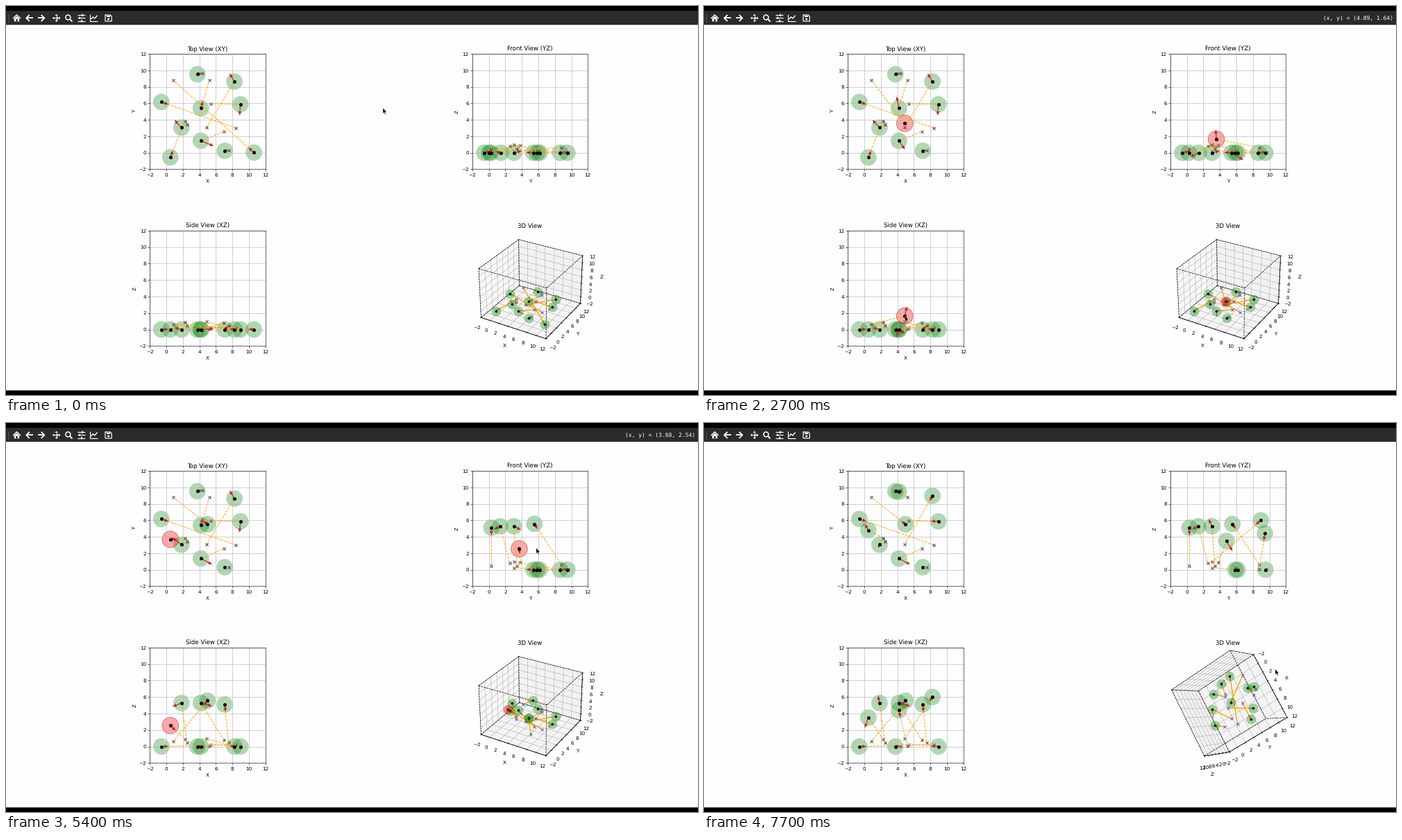
A matplotlib script for the animation above (7.8 s loop, 997x561 px).

```python
import numpy as np
import matplotlib.pyplot as plt
from matplotlib.animation import FuncAnimation
from matplotlib.patches import Circle, Polygon, Rectangle

W, H, DPI = 997, 561, 52
SIDE = 166.4                        # axes size in pixels
UNIT = SIDE / 14                    # pixels per data unit
FRAMES, STEP = 78, 100              # 7800 ms loop
LEAD = 60                           # the pointer runs ahead of the redraw
PX = 72 / DPI                       # one pixel in points
TICKS = range(-2, 13, 2)
PAPER, ARROW = '#fefdff', '#c62424'
GREEN, RED = (0, .5, 0, .3), (1, 0, 0, .33)
GREEN_RIM, RED_RIM = (0, 0, 0, 0), (.7, 0, 0, .6)

plt.rcParams.update({'text.hinting': 'none', 'axes.facecolor': PAPER})

# left, bottom (pixels), title, horizontal and vertical coordinate
VIEWS = [(207.4, 235.4, 'Top View (XY)', 0, 1),
         (671.9, 235.4, 'Front View (YZ)', 1, 2),
         (207.4, 490.3, 'Side View (XZ)', 0, 2)]
TOP, FRONT, SIDEWAYS = range(3)

# the drones start on the ground
START = np.array([
    (3.75, 9.52), (8.24, 8.64), (-.62, 6.16), (4.17, 5.4), (8.96, 5.87),
    (1.82, 3.05), (.47, -.56), (4.17, 1.45), (7.07, .24), (10.6, .02)])
START = np.c_[START, np.zeros(len(START))]
GOAL = np.array([
    (4.4, 9.65, .05), (4.84, 3.06, .95), (8.37, 3.02, .25), (5.18, 8.78, .05),
    (5.34, 5.95, .25), (2.5, 3.38, .5), (2.23, 3.85, .9), (6.94, 2.54, .8),
    (7.53, .32, .5), (.85, 8.77, .65)])

# one drone is dragged through each flat view: view, grab, release, way points
TOUR = [(TOP, 600, 1600, [(5, 2), (-.04, 3.4), (3, 1.4), (4.4, 3.57)]),
        (SIDEWAYS, 1900, 3100, [(2.6, 2.6), (4.89, 1.64), (4.97, 2.2)]),
        (FRONT, 3650, 4350, [(7, 2.4), (5.13, 1.86), (2.5, 3), (5.52, 5.56)])]
# then others are lifted at a steady beat in the front view: drone, y, z
LIFTS = [(8, .31, 5.1), (7, 1.36, 5.28), (5, 3.04, 5.28),
         (6, 4.8, 3.5), (1, 8.97, 6), (3, 9.46, 4.4)]
BEAT, REACH = 272, .33

# camera: time, elevation, azimuth, roll
CAMERA = np.array([(6150, 30, -60, 0), (6500, -37, -92, 117), (7700, 64.3, 60.2, 90)])


def sample(keys, t):
    return np.array([np.interp(t, keys[:, 0], c) for c in keys.T[1:]])


def to_pixel(view, p):
    left, bottom = VIEWS[view][:2]
    return left + (p[0] + 2) * UNIT, bottom - (p[1] + 2) * UNIT


def to_data(view, p):
    left, bottom = VIEWS[view][:2]
    return (p[0] - left) / UNIT - 2, (bottom - p[1]) / UNIT - 2


class Drag:
    def __init__(self, pos, drone, view, t0, t1, points):
        self.drone, self.view, self.t0, self.t1 = drone, view, t0, t1
        self.axes = list(VIEWS[view][3:])
        self.path = np.vstack([pos[drone, self.axes], points])
        pos[drone, self.axes] = self.path[-1]

    def at(self, t):
        """Evenly timed legs; the vertical part of each starts slower."""
        legs = len(self.path) - 1
        u = min((t - self.t0) / (self.t1 - self.t0), 1) * legs
        k = min(int(u), legs - 1)
        a, b = self.path[k:k + 2]
        return a + (b - a) * (u - k) ** np.array([1, 1.37])

    def pixel(self, t):
        return np.array(to_pixel(self.view, self.at(t)))


def plan():
    pos = START.copy()
    drags = [Drag(pos, 9, *leg) for leg in TOUR]
    for drone, y, z in LIFTS:
        t = drags[-1].t1
        drags.append(Drag(pos, drone, FRONT, t + REACH * BEAT, t + BEAT, [(y, z)]))
    return drags


DRAGS = plan()
# pointer rests, grabs and releases, then orbits the 3D view
STOPS = np.array([(0, 543, 147), (200, 543, 147)]
                 + [(t, *d.pixel(t)) for d in DRAGS for t in (d.t0, d.t1)]
                 + [(6150, 735, 420), (6560, 728, 357), (7760, 823, 355)])


def pointer(t):
    for d in DRAGS:
        if d.t0 <= t <= d.t1:
            return d.pixel(t)
    return sample(STOPS, t)


def state(t):
    """Drone positions and the index of the one being dragged."""
    pos, held = START.copy(), -1
    for d in DRAGS:
        if t >= d.t0:
            pos[d.drone, d.axes] = d.at(t)
            if t < d.t1:
                held = d.drone
    return pos, held


def velocity(pos):
    """Seek the goal; neighbours closer than 3 push each other away."""
    diff = pos[:, None] - pos
    dist = np.linalg.norm(diff, axis=2) + 1e-9
    push = (diff * (np.clip(3 - dist, 0, None) / dist)[..., None]).sum(1)
    force = np.linalg.norm(push, axis=1, keepdims=True)
    aim = GOAL - pos
    aim /= np.maximum(np.linalg.norm(aim, axis=1, keepdims=True), 1)
    pushed = 1.4 * push / np.maximum(force, 1e-9) + .45 * aim
    return np.where(force > 1e-6, pushed, .9 * aim)


def segments(a, b):
    """Point pairs split by NaN rows, so one line draws them all."""
    return np.stack([a, b, np.full_like(a, np.nan)], 1).reshape(-1, 3)


def place(left, bottom):
    return [left / W, 1 - bottom / H, SIDE / W, SIDE / H]


fig = plt.figure(figsize=(W / DPI + 1e-9, H / DPI + 1e-9), dpi=DPI, facecolor=PAPER)


class FlatView:
    def __init__(self, left, bottom, title, h, v):
        self.hv = [h, v]
        ax = fig.add_axes(place(left, bottom))
        ax.set(title=title, xlabel='XYZ'[h], ylabel='XYZ'[v])
        ax.grid(True)
        self.disks = [ax.add_patch(Circle((0, 0), 1, lw=1)) for _ in START]
        ax.plot(*GOAL[:, self.hv].T, 'x', color='#3c3860', ms=6.4, mew=1.5, zorder=2)
        self.paths, = ax.plot([], [], '--', color='orange', lw=1.3, zorder=2.2)
        self.dots, = ax.plot([], [], 'ko', ms=6, zorder=3)
        xy = START[:, self.hv]
        self.arrows = ax.quiver(*xy.T, *np.ones_like(xy).T, angles='xy',
                                scale_units='xy', scale=1, units='dots', width=1.2,
                                headwidth=4.2, headlength=5, headaxislength=4.6,
                                color=ARROW, zorder=2.6)
        ax.set(xlim=(-2, 12), ylim=(-2, 12), xticks=TICKS, yticks=TICKS)

    def update(self, pos, vel, paths, held):
        xy = pos[:, self.hv]
        for i, disk in enumerate(self.disks):
            disk.center = xy[i]
            disk.set_facecolor(RED if i == held else GREEN)
            disk.set_edgecolor(RED_RIM if i == held else GREEN_RIM)
        self.paths.set_data(*paths[:, self.hv].T)
        self.dots.set_data(*xy.T)
        self.arrows.set_offsets(xy)
        self.arrows.set_UVC(*vel[:, self.hv].T)


class SpaceView:
    def __init__(self, left, bottom):
        ax = self.ax = fig.add_axes(place(left, bottom), projection='3d')
        ax.set_title('3D View', y=1 / .92)      # undo the 3D title drop
        ax.set(xlabel='X', ylabel='Y', zlabel='Z')
        corners = np.array(np.meshgrid(*[(-2., 12.)] * 3)).reshape(3, -1).T
        pairs = [(a, b) for a in corners for b in corners
                 if (a != b).sum() == 1 and a.sum() < b.sum()]
        box = segments(*(np.array(side) for side in zip(*pairs)))
        ax.plot(*box.T, 'k--', lw=1)

        def line(style, **kw):
            return ax.plot([0], [0], [0], style, **kw)[0]

        self.paths = line('-', color='orange', lw=1.9)
        ax.plot(*GOAL.T, 'x', color='#3a30c8', ms=4.5, mew=1)
        self.arrows = line('-', color='#a03018', lw=1)
        self.dots = line('ko', ms=4.4)
        self.balls = line('o', color='green', alpha=.34, ms=14 * PX, mew=0)
        self.pick = line('o', color='red', alpha=.42, ms=14 * PX, mew=0)
        ax.set(xlim=(-2, 12), ylim=(-2, 12), zlim=(-2, 12),
               xticks=TICKS, yticks=TICKS, zticks=TICKS)

    def update(self, t, pos, vel, paths, held):
        free = np.arange(len(pos)) != held
        self.paths.set_data_3d(*paths.T)
        self.balls.set_data_3d(*pos[free].T)
        self.pick.set_data_3d(*pos[~free].T)
        self.arrows.set_data_3d(*segments(pos, pos + vel).T)
        self.dots.set_data_3d(*pos.T)
        self.ax.view_init(*sample(CAMERA, t))


flat = [FlatView(*v) for v in VIEWS]
space = SpaceView(VIEWS[FRONT][0], VIEWS[SIDEWAYS][1])

# window chrome, in stage pixels
ui = fig.add_axes([0, 0, 1, 1], zorder=5)
ui.set(xlim=(0, W), ylim=(H, 0))
ui.axis('off')


def bar(x, y, w, h, color):
    ui.add_patch(Rectangle((x, y), w, h, fc=color, lw=0, snap=False))


def stroke(points, px=1.5):
    ui.plot(*np.array(points).T, color='w', lw=px * PX,
            solid_capstyle='butt', solid_joinstyle='miter')


def fill(points):
    ui.add_patch(Polygon(points, fc='w', lw=0))


def ring(x, y, r, **kw):
    ui.add_patch(Circle((x, y), r, **kw))


def toolbar(y=17.4):
    for dy in range(-5, 6, 2):
        bar(3, y + dy, 1.5, 1, '#6a6a6c')
    # home
    stroke([(10, y + .6), (15.5, y - 4.6), (21, y + .6)], 1.4)
    fill([(11.8, y + .6), (15.5, y - 2.8), (19.2, y + .6), (19.2, y + 4.9),
          (11.8, y + 4.9)])
    bar(14.3, y + 1.6, 2.4, 3.4, '#2b2b2d')
    # back and forward
    for x, s in ((33.5, 1), (51, -1)):
        stroke([(x - 4 * s, y), (x + 5 * s, y)], 1.8)
        stroke([(x + .3 * s, y - 4.6), (x - 4.3 * s, y), (x + .3 * s, y + 4.6)], 1.8)
    # pan
    for dx, dy in ((1, 0), (-1, 0), (0, 1), (0, -1)):
        ex, ey = 72.7 + 3.4 * dx, y + 3.4 * dy
        stroke([(72.7, y), (ex, ey)], 1.4)
        fill([(ex + 2.4 * dx, ey + 2.4 * dy), (ex + 2.1 * dy, ey + 2.1 * dx),
              (ex - 2.1 * dy, ey - 2.1 * dx)])
    # zoom
    ring(89.4, y - 1, 3.5, fill=False, ec='w', lw=1.5 * PX)
    stroke([(91.9, y + 1.5), (95.5, y + 5.1)], 2)
    # sliders
    for dy, knob in ((-4.2, 110), (0, 106), (4.2, 109)):
        stroke([(103, y + dy), (113.6, y + dy)], 1.2)
        bar(knob - 1, y + dy - 1.6, 2, 3.2, 'w')
    # chart
    stroke([(120.9, y - 5), (120.9, y + 4.4), (132, y + 4.4)], 1.2)
    stroke([(122.5, y + 1.6), (125.4, y - 1.6), (127.8, y + .6), (131.6, y - 3.8)], 1.4)
    # save
    stroke([(143, y - 4.4), (150.3, y - 4.4), (152.2, y - 2.4), (152.2, y + 4.6),
            (143, y + 4.6), (143, y - 5)], 1.2)
    stroke([(144.8, y - 2.4), (149.8, y - 2.4)], 2)
    ring(147.6, y + 1.6, 1.5, fc='w', lw=0)


bar(0, 0, W, 7, 'k')
bar(0, 7, W, 20.2, '#2b2b2d')
bar(0, 554.4, W, 7, 'k')
toolbar()
readout = ui.text(993.5, 17.3, '', ha='right', va='center', color='w',
                  family='DejaVu Sans Mono', size=11)
SHAPE = np.array([(0, 0), (0, 8), (1.8, 6.4), (3.2, 9.4), (4.4, 8.8),
                  (3.1, 6), (5.4, 5.8)])
cursor = ui.add_patch(Polygon(SHAPE, fc='#111111', ec='#e8e8e8', lw=.5))


def coords(p):
    for i, (left, bottom, *_) in enumerate(VIEWS):
        if 0 <= p[0] - left <= SIDE and 0 <= bottom - p[1] <= SIDE:
            return '(x, y) = ({:.2f}, {:.2f})'.format(*to_data(i, p))
    return ''


def draw(frame):
    t = frame * STEP
    pos, held = state(t)
    vel = velocity(pos)
    way = GOAL - pos
    way /= np.linalg.norm(way, axis=1, keepdims=True)
    paths = segments(pos, GOAL + .25 * way)
    for view in flat:
        view.update(pos, vel, paths, held)
    space.update(t, pos, vel, paths, held)
    readout.set_text(coords(pointer(t)))
    cursor.set_xy(SHAPE + pointer(t + LEAD))
    return []


anim = FuncAnimation(fig, draw, frames=FRAMES, interval=STEP, repeat=True,
                     repeat_delay=0)
plt.show()
```
